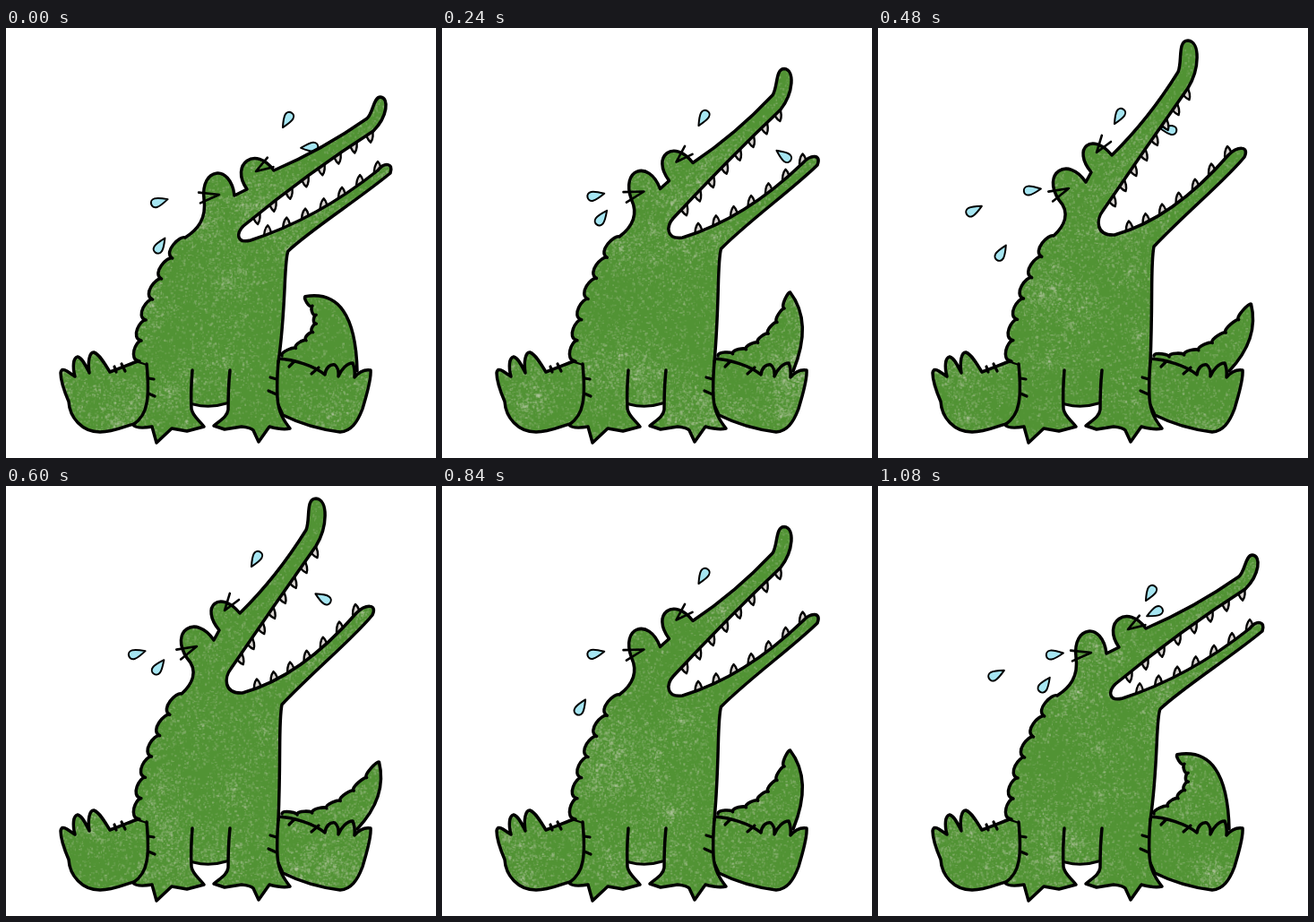
Write an HTML page with a canvas that moves like this. It is 480 px wide and 480 px high and loops after 1200 ms.

```html
<!DOCTYPE html>
<html lang="en">
<head>
<meta charset="utf-8">
<title>Crying crocodile</title>
<style>
  html, body { margin: 0; width: 100%; height: 100%; overflow: hidden; background: #fff; }
  canvas { display: block; width: 480px; height: 480px; }
</style>
</head>
<body>
<canvas id="stage" width="480" height="480"></canvas>
<script>
const SIZE = 480, STEP = 120, STEPS = 10;
const ctx = document.getElementById('stage').getContext('2d');

const lerp = (a, b, t) => a + (b - a) * t;
const mix = (a, b, t) => [lerp(a[0], b[0], t), lerp(a[1], b[1], t)];
const quad = (a, c, b, t) => mix(mix(a, c, t), mix(c, b, t), t);
const polar = ([x, y], angle, r) => [x + Math.cos(angle) * r, y + Math.sin(angle) * r];
const deg = d => d * Math.PI / 180;
const cubicTo = (path, a, b, c) => path.bezierCurveTo(...a, ...b, ...c);
const quadTo = (path, c, p) => path.quadraticCurveTo(...c, ...p);

// Still parts
const hindLegs = [
  'M158 438C135 441 126 450 106 450C86 450 72 434 71 416C65 402 62 391 62 384Q63 378 69 382L78 388C75 377 76 367 81 366C86 367 90 376 94 384C92 372 94 361 99 361C105 363 111 373 117 383C123 381 140 374 148 371L158 374',
  'M305 368C322 369 345 376 357 386C358 378 363 374 368 375Q373 379 372 388C375 380 382 373 388 373Q391 380 390 389C395 383 402 380 408 381C409 392 403 410 399 424C393 440 386 449 374 450C350 447 330 441 310 431L305 420'
].map(d => new Path2D(d));
const frontLegs = [
  'M158 374C160 395 160 408 158 418C156 430 150 437 143 442Q147 447 164 444L169 462L186 446L203 449L222 444C216 436 209 432 208 424Q207 405 209 381',
  'M251 381Q249 400 249 425C248 433 240 437 233 443L245 447L264 444Q274 445 277 448L283 461L295 444Q310 448 318 446C311 437 305 428 304 412Q303 395 305 371'
].map(d => new Path2D(d));
const creases = new Path2D('M122 377L124 383M130 374L134 382M323 371L317 377M350 378L342 385M160 390L166 391M160 407L167 410M296 389L303 391M294 404L303 408M210 419Q228 424 247 418');

// Bumps between points, fuller at the start of each one.
function scallops(path, pts, bulge) {
  path.moveTo(...pts[0]);
  for (let i = 1; i < pts.length; i++) {
    const [x, y] = pts[i - 1], [u, v] = pts[i], len = Math.hypot(u - x, v - y);
    const nx = (v - y) / len * bulge, ny = (x - u) / len * bulge;
    cubicTo(path, [x + nx * 1.3, y + ny * 1.3], [u + nx * .6, v + ny * .6], [u, v]);
  }
}

// Arch from a to b, at right angles to the line between them.
function dome(path, a, b, height) {
  const len = Math.hypot(b[0] - a[0], b[1] - a[1]), k = height * 4 / 3 / len;
  const n = [(b[1] - a[1]) * k, (a[0] - b[0]) * k];
  cubicTo(path, [a[0] + n[0], a[1] + n[1]], [b[0] + n[0], b[1] + n[1]], b);
}

// All moving key points for a lift from 0 (head low) to 1 (head thrown back).
function rig(lift) {
  const at = (x, y, u, v) => mix([x, y], [u, v], lift);
  const body = new Path2D();
  const nape = at(201, 233, 197, 231), bumps = 6;
  const spine = Array.from({ length: bumps + 1 }, (_, i) => {
    const t = i / bumps;
    return [lerp(150, nape[0], t ** 1.8), lerp(371, nape[1], t)];
  });
  scallops(body, spine, 10);

  const brow = at(256, 186, 233, 171), bridge = at(270, 179, 239, 160), leftLid = at(222, 190, 203, 191);
  cubicTo(body, at(215, 224, 208, 221), at(225, 212, 217, 206), leftLid);
  dome(body, leftLid, brow, 27);
  body.lineTo(...bridge);
  dome(body, bridge, at(300, 158, 262, 141), 26);

  const upper = [at(411, 114, 347, 66), at(339, 160, 299, 134), at(266, 220, 252, 203)];
  const lower = [at(274, 236, 265, 230), at(348, 212, 330, 212), at(416, 158, 392, 141)];
  quadTo(body, at(354, 135, 303, 101), at(404, 100, 336, 48));
  cubicTo(body, at(411, 94, 341, 36), at(411, 76, 335, 13), at(419, 76, 347, 13));
  cubicTo(body, at(429, 77, 361, 14), at(427, 98, 360, 45), upper[0]);
  quadTo(body, upper[1], upper[2]);
  cubicTo(body, at(258, 228, 245, 212), at(258, 240, 243, 231), lower[0]);
  quadTo(body, lower[1], lower[2]);
  cubicTo(body, at(423, 149, 402, 131), at(434, 149, 416, 130), at(430, 161, 410, 143));
  cubicTo(body, at(395, 190, 390, 168), at(340, 225, 345, 205), at(316, 248, 309, 243));
  cubicTo(body, at(311, 258, 305, 262), at(314, 310, 308, 300), [305, 372]);

  return { body, upper, lower, leftEye: at(239, 185, 214, 178), rightEye: at(280, 159, 245, 138) };
}

// The tail unrolls quickly at first, then slows.
function tailPath(lift) {
  const t = lift ** .57, root = [309, 365];
  const tip = polar([345, 370], deg(lerp(-98, -41, t)), lerp(72, 96, t));
  const inner = [370, lerp(336, 374, t)];
  const path = new Path2D();
  scallops(path, Array.from({ length: 8 }, (_, i) => quad(root, inner, tip, i / 7)), 4);
  quadTo(path, mix([391, 289], [427, 346], t), [393, 382]);
  return path;
}

// Tears leave the eyes at even intervals; age is counted in steps.
const streams = [
  { side: 'left', first: 8, gap: 10 / 4, fly: a => [-15 - 26 * a, 2 * a * a] },
  { side: 'left', first: 7, gap: 10 / 3, fly: a => [-24 - 14 * a, 16 * a + a * a] },
  { side: 'right', first: 0, gap: 10 / 4, fly: a => [10 + 10 * a, -15 - 17 * a] },
  { side: 'right', first: 8.33, gap: 10 / 3, fly: a => [10 + 30 * a, -7 - 22 * a + 6 * a * a] }
];

function seeded(s) {
  return () => {
    s = (s + 0x6D2B79F5) | 0;
    let t = Math.imul(s ^ (s >>> 15), 1 | s);
    t = (t + Math.imul(t ^ (t >>> 7), 61 | t)) ^ t;
    return ((t ^ (t >>> 14)) >>> 0) / 4294967296;
  };
}

// Crayon green: fine grain all over, with paler clouds.
function crayon(seed) {
  const c = document.createElement('canvas');
  c.width = c.height = SIZE;
  const g = c.getContext('2d'), rnd = seeded(seed * 97 + 5);
  const speck = (x, y, strength) => {
    g.globalAlpha = strength * rnd();
    g.fillRect(x, y, 1 + rnd() * 2, 1 + rnd() * 2);
  };
  g.fillStyle = '#519334';
  g.fillRect(0, 0, SIZE, SIZE);
  g.fillStyle = '#b6c8a4';
  for (let i = 0; i < 16000; i++) speck(rnd() * SIZE, rnd() * SIZE, .3);
  for (let cloud = 0; cloud < 60; cloud++) {
    const x = lerp(60, 430, rnd()), y = lerp(60, 460, rnd()), r = lerp(25, 65, rnd());
    for (let i = 0; i < 200; i++) speck(...polar([x, y], rnd() * 2 * Math.PI, r * rnd()), .35);
  }
  return ctx.createPattern(c, 'no-repeat');
}
const greens = Array.from({ length: STEPS }, (_, i) => crayon(i));

function ink(path, fill, width = 3.5) {
  if (fill) {
    ctx.fillStyle = fill;
    ctx.fill(path);
  }
  ctx.lineWidth = width;
  ctx.stroke(path);
}

// Fills an open shape down to extra hidden points, but strokes only its own line.
function inkOpen(path, fill, hidden) {
  const area = new Path2D(path);
  hidden.forEach(p => area.lineTo(...p));
  ctx.fillStyle = fill;
  ctx.fill(area);
  ink(path);
}

function placed([x, y], angle, paint) {
  ctx.save();
  ctx.translate(x, y);
  ctx.rotate(angle);
  paint();
  ctx.restore();
}

const tear = new Path2D('M10 0C4 -3 0 -5 -4 -5C-11 -5 -11 5 -4 5C0 5 4 3 10 0Z');
const tooth = new Path2D('M-4 -6C-4.5 2 -3 7 0 10C3 7 4.5 2 4 -6Z');

function drawTears(n, eyes) {
  for (const { side, first, gap, fly } of streams) {
    const youngest = (n - first + STEPS) % gap;
    for (let age = youngest; age < 4; age += gap) {
      if (age < .4) continue;
      const [dx, dy] = fly(age), [px, py] = fly(age - .1);
      const spot = [eyes[side][0] + dx, eyes[side][1] + dy];
      placed(spot, Math.atan2(py - dy, px - dx), () => ink(tear, '#a6e6f2', 2));
    }
  }
}

function drawTeeth(curve, count, from, angle) {
  for (let i = 0; i < count; i++) {
    const t = lerp(from, from + .87, i / (count - 1));
    placed(quad(...curve, t), angle, () => ink(tooth, '#d8d4d0', 2.4));
  }
}

function chevron(apex, angle, spread, length) {
  const path = new Path2D();
  path.moveTo(...polar(apex, deg(angle - spread), length));
  path.lineTo(...apex);
  path.lineTo(...polar(apex, deg(angle + spread), length));
  ink(path, null, 2.6);
}

function draw(n) {
  const lift = Math.min(n, STEPS - 1 - n) / 4;
  const green = greens[n], croc = rig(lift);
  ctx.fillStyle = '#fff';
  ctx.fillRect(0, 0, SIZE, SIZE);
  ctx.strokeStyle = '#000';
  ctx.lineCap = ctx.lineJoin = 'round';

  ctx.save();
  ctx.translate(-1, 1);
  inkOpen(tailPath(lift), green, [[385, 400], [309, 400]]);
  hindLegs.forEach(leg => ink(leg, green));
  drawTears(n, { left: croc.leftEye, right: croc.rightEye });
  drawTeeth(croc.upper, 8, .03, -lerp(.15, .45, lift));
  drawTeeth(croc.lower, 7, .13, Math.PI - .1 * lift);
  inkOpen(croc.body, green, [[303, 419], [247, 419], [228, 421], [210, 419], [158, 418], [158, 374]]);
  frontLegs.forEach(leg => ink(leg, green));
  ink(creases, null, 3.2);
  chevron(croc.leftEye, lerp(171, 156, lift), 15, 23);
  chevron(croc.rightEye, lerp(-32, -55, lift), 18, 20);
  ctx.restore();
}

const start = performance.now();
let shown = -1;
function tick() {
  const n = Math.floor((performance.now() - start) / STEP) % STEPS;
  if (n !== shown) draw(shown = n);
  requestAnimationFrame(tick);
}
tick();
</script>
</body>
</html>
```
